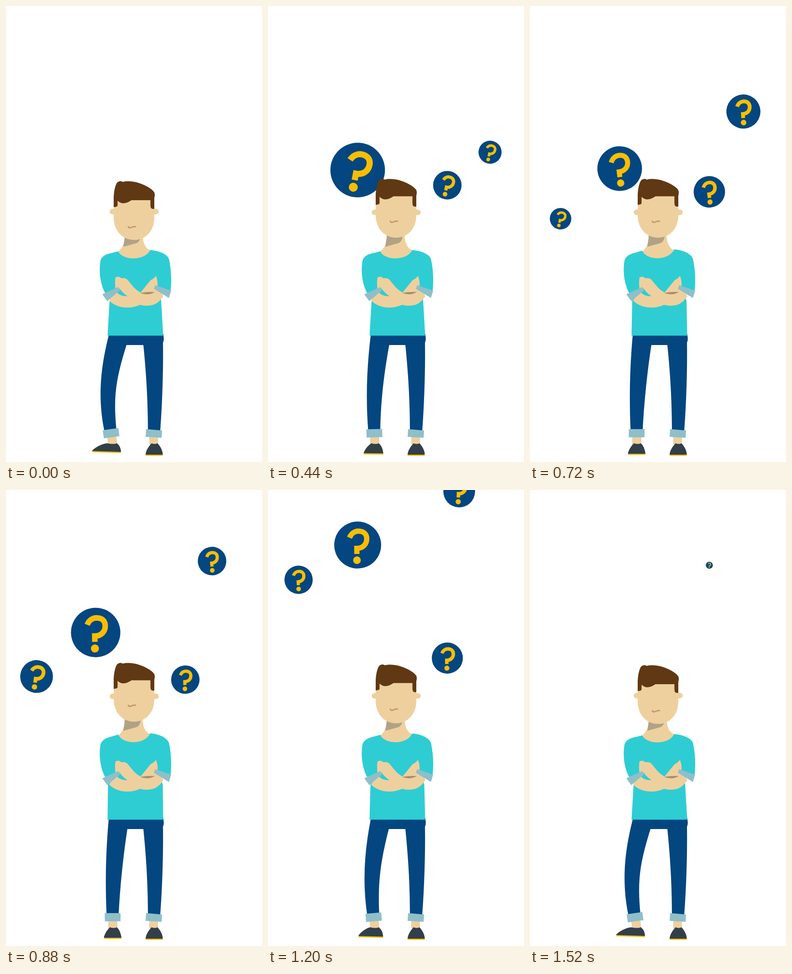
Recreate the animation shown at these times as an HTML page. Size 561 px wide and 998 px high, loop 1.56 s.

```html
<!DOCTYPE html>
<html lang="en">
<head>
<meta charset="utf-8">
<title>Puzzled man</title>
<style>
html, body { margin: 0; width: 100%; height: 100%; overflow: hidden; background: #fff; }
svg { display: block; width: 561px; height: 998px; }
</style>
</head>
<body>
<svg id="stage" viewBox="0 0 561 998"></svg>
<script>
const LOOP = 1560, STEP = 40;
const SKIN = '#eed09e', SHIRT = '#2ecdd3', NAVY = '#04467f', CUFF = '#8fbfc9',
      SHOE = '#323f4a', GOLD = '#fabe00', HAIR = '#603813', MOUTH = '#c49a6c';
const stage = document.getElementById('stage');

function add(parent, tag, attrs) {
  const el = document.createElementNS('http://www.w3.org/2000/svg', tag);
  for (const key in attrs) el.setAttribute(key, attrs[key]);
  return parent.appendChild(el);
}

const ramp = (t, from, to) => Math.min(1, Math.max(0, (t - from) / (to - from)));
const ease = (t, from, to) => (1 - Math.cos(Math.PI * ramp(t, from, to))) / 2;
const swing = (age, period, decay) => Math.exp(-age / decay) * Math.cos(2 * Math.PI * age / period);

// Quick rise to an overshoot, then a damped settle.
function pop(age) {
  if (age <= 0) return 0;
  if (age < 450) return 1.14 * Math.sin(Math.PI / 2 * age / 450);
  return 1 + .14 * swing(age - 450, 500, 400);
}
const tilt = age => 11 * swing(Math.max(0, age - 290), 580, 720);

// Each bubble climbs by height between two times; slant is its sideways share.
const bubbles = [
  { x: 196.5, y: 359, r: 52.5, start: 0, height: 430, from: 665, to: 1665, end: 1500 },
  { x: 489.5, y: 333.5, r: 33.5, start: 233, height: 416, from: 290, to: 1590, end: 1560, slant: .2135 },
  { x: 393, y: 378, r: 33.5, start: 166, height: 403, from: 1000, to: 1900, end: 1545, sink: 37 },
  { x: 67, y: 476, r: 33.5, start: 530, height: 515, from: 620, to: 1720, end: 1500 }
];

for (const b of bubbles) {
  b.el = add(stage, 'g', {});
  add(b.el, 'circle', { r: 52.5, fill: NAVY });
  add(b.el, 'path', { d: 'M-18-16.5C-14-26-6-31 2-31C14-31 20.5-24 20.5-14C20.5-2 12 7.5-2 7.5V20', fill: 'none', stroke: GOLD, 'stroke-width': 11.8 });
  add(b.el, 'circle', { cx: -2, cy: 34, r: 8.6, fill: GOLD });
}

function drawBubble(b, t) {
  const climb = b.height * ease(t, b.from, b.to);
  const x = b.x - climb * (b.slant || 0);
  const y = b.y - climb + (b.sink || 0) * ramp(t, b.start, 880);
  const scale = pop(t - b.start) * (1 - ramp(t, b.end - 205, b.end) ** 2) * b.r / 52.5;
  const angle = tilt(t - Math.max(b.start, 166));
  b.el.setAttribute('transform', `translate(${x} ${y}) rotate(${angle}) scale(${scale})`);
}

const part = (fill, d = '', parent = stage) => add(parent, 'path', { fill, d });
const shift = (el, y) => el.setAttribute('transform', `translate(0 ${y})`);

// Neck and head
part(SKIN, 'M260 495C260 520 258 527 245 538C255 560 306 560 317 535C306 531 299 520 299 495Z');
part('#b2a285', 'M260 495V508L257 527L286 519Q293 516 295 505V495Z');
const face = part(SKIN, 'M236 425V463C236 492 255 512 281 512C306 512 325 492 325 463V425Z');
const ears = part(SKIN, 'M238 444H234C225 444 225 456 234 456H238ZM324 444H328C337 444 337 456 328 456H324Z');
const hair = part(HAIR, 'M236 440V423C236 405 240 390 244 386Q250 381 256 385C283 378 320 398 325 408Q327 413 325 420V444H321Q316.5 443 316.5 437H244.5Q243 440 236.5 440Z');
const forehead = part(SKIN, 'M244.5 426Q256 438 275 425H316.5V450H244.5Z');
const mouth = add(stage, 'path', { d: 'M268 483Q270 487 275 484.5Q280 482 284 483', fill: 'none', stroke: MOUTH, 'stroke-width': 3, 'stroke-linecap': 'round' });

// Legs
const jeans = part(NAVY);
const ankle = add(stage, 'g', {});
part(SKIN, 'M224 943H244V960H224Z', ankle);
part(CUFF, 'M216.5 926H251V944H216.5Z', ankle);
const leftSole = part(GOLD), leftShoe = part(SHOE);
part(SKIN, 'M314 943H333V960H314Z');
const rightShoe = 'M306 982C306 973 314 962 319 957Q326 960 332 957C337 962 344 973 343.5 982Z';
shift(part(GOLD, rightShoe), 2.6);
part(SHOE, rightShoe);
part(CUFF, 'M307 926L342 929L341 945L306 943Z');

// Shirt and folded arms
const shirt = part(SHIRT);
part(SKIN, 'M240 594Q247 590 253 596Q262 594 267 600C275 610 284 622 295 627Q307 612 317 600Q324 597 328.5 590.5Q333 601 332 612L345 635Q335 650 323 654Q307 658 294 654C272 664 244 662 226 645L240 620Q238 605 240 594Z');
part(SHIRT, 'M249 618Q255 628 266 635Q253 636 244 628Z');
part('#a68f6d', 'M294 628Q310 625 326 626Q312 635 294 628Z');
part(CUFF, 'M211 631L246 615L250 622L222 646ZM327 611L362 623L357 639L324 619Z');

function drawHead(up) {
  shift(face, -5 * up);
  shift(ears, 1.5 * up);
  shift(hair, -5 * up);
  shift(forehead, -8.5 * up);
  shift(mouth, -12 * up);
}

function drawLeg(bend) {
  const b = bend;
  jeans.setAttribute('d', `M345 718H225V721C${219 - 11 * b} 788 ${217 - 17 * b} 855 ${220.5 - 5 * b} 930
    L${247 - 5 * b} 928C${250 - 16 * b} ${868 - 18 * b} ${257 - 14 * b} ${800 + 10 * b} ${266 - 2 * b} 742
    H301C308 810 311 870 311 930H338C342 880 345 800 344 737Q347 730 345 722Z`);
  ankle.setAttribute('transform', `translate(${-3.5 * b} 0) rotate(${-8 * b} 234 935)`);
  const shoe = `M${214.5 - 26.5 * b} ${980 - 6 * b}C${216 - 22 * b} ${971 - 4 * b} ${223 - 14 * b} ${961 - 3 * b} ${228 - 6 * b} 957
    Q${236 - b} 960 243 957Q${251 + b} 964 ${253 - b} ${980 - 4 * b}Z`;
  leftShoe.setAttribute('d', shoe);
  leftSole.setAttribute('d', shoe);
  shift(leftSole, 2.6);
}

function drawShirt(breath) {
  const rise = 1.7 * breath, slack = 3.5 * breath;
  shirt.setAttribute('d', `M246 ${537 - rise}L${222 + slack} ${543 - rise}C212 ${547 - rise} 207 553 206.5 561
    C204 578 205 605 217 628L232 625L${227 - slack} 645L222.5 721.5H344.5L${340 + slack} 645L338 628L361 622
    C363 598 362 578 358 558C358 548 345 ${537 - rise} 316 ${534 - rise}C305 558 256 558 246 ${537 - rise}Z`);
}

function draw(t) {
  drawHead(ease(t, 0, 400) - ease(t, 840, 1400));
  drawLeg(1 - ease(t, 140, 560) + ease(t, 860, 1440));
  drawShirt(ease(t, 480, 800) - ease(t, 1040, 1480));
  for (const b of bubbles) drawBubble(b, t);
}

const begin = performance.now();
function tick() {
  const t = (performance.now() - begin) % LOOP;
  draw(Math.floor(t / STEP) * STEP);
  requestAnimationFrame(tick);
}
tick();
</script>
</body>
</html>
```
